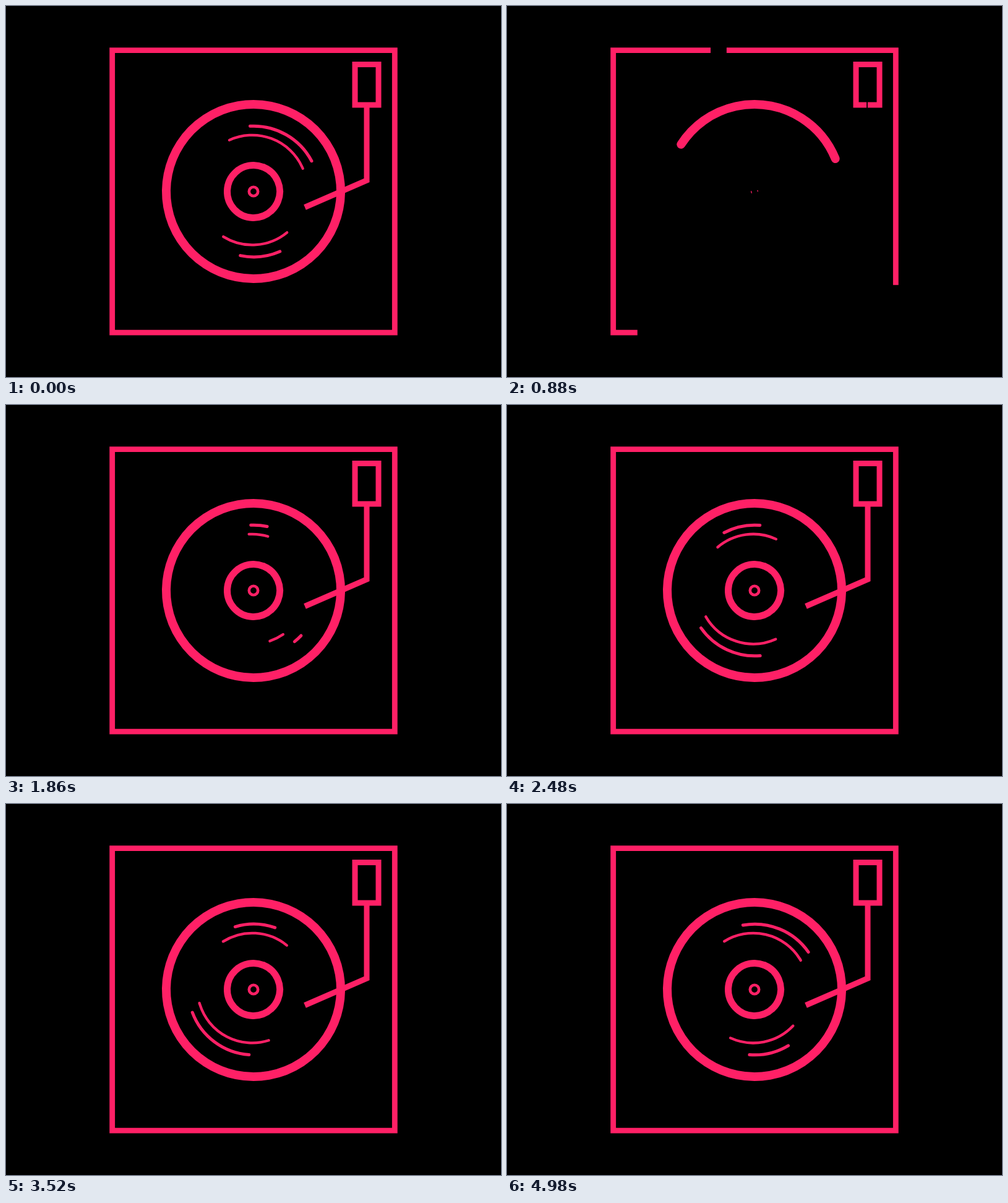
An HTML page with a canvas that plays this animation: 800 by 600 pixels, repeating every 5 s.

```html
<!DOCTYPE html>
<html>
<head>
<meta charset="utf-8">
<style>
html, body { margin: 0; height: 100%; overflow: hidden; background: #000; }
canvas { display: block; }
</style>
</head>
<body>
<canvas width="800" height="600"></canvas>
<script>
const ctx = document.querySelector('canvas').getContext('2d');
const LOOP = 5000, CLEARED = 480, BUILD_START = 510, BUILD_END = 1640;
const SPIN = 0.36; // degrees per ms

// Smooth 0..1 progress of time t
function ease(t, start, duration) {
  const u = Math.min(1, Math.max(0, (t - start) / duration));
  return u * u * (3 - 2 * u);
}

// Arc between two angles, in degrees clockwise from the top
function arc(cx, cy, r, from, to, width) {
  const rad = deg => (deg - 90) * Math.PI / 180;
  ctx.lineWidth = width;
  ctx.lineCap = 'round';
  ctx.setLineDash([]);
  ctx.beginPath();
  ctx.arc(cx, cy, r, rad(from), rad(to));
  ctx.stroke();
}

// Part of a path between two distances along it
function trim(path, total, from, to, width) {
  const len = Math.min(total, to - from);
  if (len <= 0) return;
  ctx.lineWidth = width;
  ctx.lineCap = 'butt';
  ctx.setLineDash(len < total ? [len, total - len] : []);
  ctx.lineDashOffset = -from;
  ctx.stroke(path);
}

const frame = new Path2D('M272 71.6H628.3V528.2H171.7V71.6Z');
const frameLen = 4 * 456.6;
const head = new Path2D('M583 94.5H602V160H564V94.5Z');
const headLen = 207;
const arm = new Path2D('M583 160V282L483 325.5');
const armLen = 122 + Math.hypot(100, 43.5);

function drawFrame(v) {
  const p = ease(v, 410, 740);
  const origin = 233 * (1 - p);
  const near = 43 * (1 - p);
  const far = 90 + (frameLen / 2 - 90) * p;
  trim(frame, frameLen, origin + near, origin + far, 8.8);
  trim(frame, frameLen, origin - far, origin - near, 8.8);
}

function drawDeck(v) {
  drawFrame(v);

  const half = headLen / 2 * ease(v, 380, 530);
  trim(head, headLen, 1 - half, 1 + half, 9);
  trim(arm, armLen, 0, armLen * ease(v, 960, 660), 9);

  const disc = ease(v, 470, 1035);
  const mid = 2 + 9.5 * disc;
  arc(400, 300, 141, mid - 180 * disc, mid + 180 * disc, 14);

  const label = ease(v, 750, 597);
  if (label > 0) {
    for (const [angle, spread] of [[79.5, 57.5], [259.5, 122.5]]) {
      arc(400, 300, 42.5 * label, angle - spread * label, angle + spread * label, 11 * label);
    }
  }
  const hole = ease(v, 1040, 490);
  if (hole > 0) arc(400, 300, 7.2 * hole, 0, 360, 4.6 * hole);
}

function drawGrooves(t, grow) {
  if (grow <= 0) return;
  const turn = t * SPIN;
  const groove = (x, y, r, end, length, width) =>
    arc(x, y, r, turn + end - length * grow, turn + end, width);
  groove(400.3, 300, 105.8, 61.9, 65.4, 5);
  groove(400.3, 300, 105.8, 191.4, 35.4, 5);
  groove(398, 297.6, 88.8, 66.6, 91.6, 4.3);
  groove(398, 297.6, 88.8, 211.4, 71, 4.3);
}

function draw(now) {
  const t = now % LOOP;
  ctx.fillStyle = '#000';
  ctx.fillRect(0, 0, 800, 600);
  ctx.strokeStyle = '#ff2066';
  if (t < CLEARED) {
    // The build runs backwards, faster
    drawDeck(BUILD_END - (BUILD_END - BUILD_START) * t / CLEARED);
    drawGrooves(t, 1 - ease(t, 0, 300));
  } else if (t >= BUILD_START) {
    drawDeck(t);
    drawGrooves(t, ease(t, 1500, 1195));
  }
}

const began = performance.now();
function tick() {
  draw(performance.now() - began);
  requestAnimationFrame(tick);
}
tick();
</script>
</body>
</html>
```
